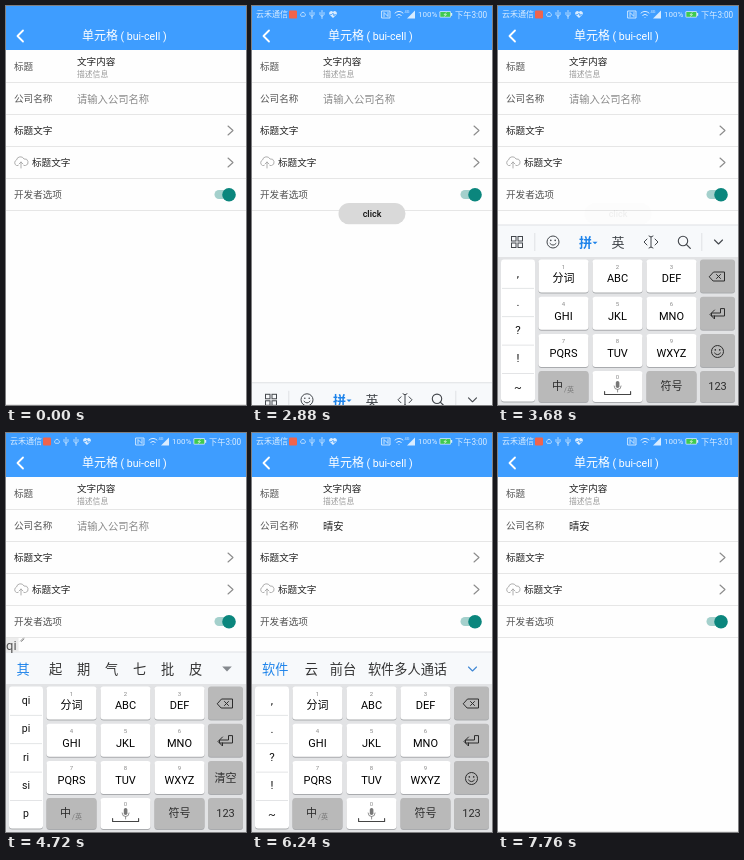
An HTML page with a canvas that plays this animation: 240x399 px, repeating every 8000 ms.

```html
<!DOCTYPE html>
<html lang="zh-CN">
<head>
<meta charset="utf-8">
<title>bui-cell</title>
<style>
html, body { margin: 0; width: 100%; height: 100%; overflow: hidden; background: #fff; }
canvas { display: block; width: 240px; height: 399px; }
</style>
</head>
<body>
<canvas id="stage"></canvas>
<script>
const W = 240, H = 399, LOOP = 8000, STEP = 80;
const FONT = 'Roboto, "Noto Sans CJK SC", "Noto Sans CJK", sans-serif';
const canvas = document.getElementById('stage');
const c = canvas.getContext('2d');
const dpr = window.devicePixelRatio || 1;
canvas.width = W * dpr;
canvas.height = H * dpr;

const clamp = v => Math.max(0, Math.min(1, v));
const ramp = (t, a, b) => clamp((t - a) / (b - a));
const smooth = p => p * p * (3 - 2 * p);

// y is the optical middle of the line
function text(s, x, y, size, color, weight = 400, align = 'left') {
  c.font = `${weight} ${size}px ${FONT}`;
  c.textAlign = align;
  c.fillStyle = color;
  c.fillText(s, x, y + size * 0.37);
}
const label = (s, x, y, size, color = '#111', weight) => text(s, x, y, size, color, weight, 'center');

function rect(x, y, w, h, color) {
  c.fillStyle = color;
  c.fillRect(x, y, w, h);
}
function round(x, y, w, h, r, color) {
  c.fillStyle = color;
  c.beginPath();
  c.roundRect(x, y, w, h, r);
  c.fill();
}
function disc(x, y, r, color) {
  c.fillStyle = color;
  c.beginPath();
  c.arc(x, y, r, 0, 7);
  c.fill();
}
function ring(x, y, r, color, width = 1) {
  c.strokeStyle = color;
  c.lineWidth = width;
  c.beginPath();
  c.arc(x, y, r, 0, 7);
  c.stroke();
}
function path(d, x, y, color, width = 1, fill = false) {
  c.save();
  c.translate(x, y);
  const p = new Path2D(d);
  if (fill) {
    c.fillStyle = color;
    c.fill(p);
  } else {
    c.strokeStyle = color;
    c.lineWidth = width;
    c.lineJoin = c.lineCap = 'round';
    c.stroke(p);
  }
  c.restore();
}
const triangle = (x, y, r, color) => path(`M${-r} ${-r / 2}H${r}L0 ${r / 2}Z`, x, y, color, 1, true);
function smiley(x, y, color) {
  ring(x, y, 6, color);
  disc(x - 2.2, y - 1.6, 0.8, color);
  disc(x + 2.2, y - 1.6, 0.8, color);
  path('M-3 1.5Q0 5 3 1.5', x, y, color);
}

function statusBar(t) {
  c.globalAlpha = ramp(t, 0, 400);
  const ink = '#d9ecff';
  text('云禾通信', 4, 8.5, 8, ink);
  round(37, 4.5, 8, 8, 1, '#f0644c');
  path('M-2 2A1.6 1.6 0 0 1 -1.6 -.6A1.7 1.7 0 0 1 1.6 -.6A1.6 1.6 0 0 1 2 2Z', 51, 8, ink, 0.8);
  for (const x of [60, 70]) path('M0 4V-4M-2 -2V0L0 2L2 0V-2', x, 8.5, ink, 0.8);
  path('M0 3.5L-3.5 0A2 2 0 0 1 0 -2.5A2 2 0 0 1 3.5 0Z', 81, 8.5, ink, 1, true);
  path('M-2.5 0H-1L0 -1.5L1 1.5L1.5 0H2.5', 81, 8.5, '#3b9cff', 0.7);
  path('M-4 -3.5H4V3.5H-4ZM-2 2V-2L2 2V-2', 134, 8.5, ink, 0.9);
  path('M-4 -1.5Q0 -5 4 -1.5M-2.3 0.8Q0 -1.4 2.3 0.8M0 3V3', 147, 8.5, ink, 1);
  text('4G', 152.5, 6, 4, ink);
  path('M-4 4L4 4L4 -4Z', 159, 8.5, ink, 1, true);
  text('100%', 166, 8.5, 8, ink);
  round(187.5, 5.2, 11.5, 6.4, 1, ink);
  rect(188.3, 6, 10, 4.8, '#3fca50');
  rect(199, 7, 1.2, 2.8, ink);
  path('M.8 -1.8L-1.2 .2H1.2L-.8 1.8', 193.3, 8.4, '#fff', 0.6);
  text(t < 6560 ? '下午3:00' : '下午3:01', 203, 8.5, 8.2, ink);
  c.globalAlpha = 1;
}

function page(t) {
  rect(0, 0, W, H, '#fefefe');
  rect(0, 0, W, 44, '#3e9dff');
  path('M3 -5.5L-2.5 0L3 5.5', 14, 30, '#fff', 1.8);
  text('单元格', 76, 30, 12, '#fff');
  text('( bui-cell )', 114.5, 30, 10.6, '#fff');
  statusBar(t);

  for (let y = 76; y <= 204; y += 32) rect(0, y, W, 1, '#e6e6e6');
  rect(0, 398, W, 1, '#e6e6e6');
  const gray = '#555', dark = '#222', size = 9.6;
  text('标题', 8, 60.5, size, gray);
  text('文字内容', 71, 55.5, size, dark, 500);
  text('描述信息', 71, 67.7, 7.8, '#999');
  text('公司名称', 8, 92.7, size, gray);
  if (t < 6240) text('请输入公司名称', 71, 93, 10.3, '#8a8a8a');
  else text('晴安', 71, 92.7, 10.3, dark);
  text('标题文字', 8, 124.6, size, dark, 500);
  text('标题文字', 26, 156.6, size, dark, 500);
  for (const y of [124.5, 156.5]) path('M-2.5 -4.5L2.5 0L-2.5 4.5', 224.5, y, '#8c8c8c', 1.1);
  path('M-3 3.5H-4.5A3 3 0 0 1 -4.5 -2A4 4 0 0 1 3 -3A3.3 3.3 0 0 1 4.5 3.5H3M0 6V0M-2 2L0 0L2 2', 15, 156, '#a6a6a6', 0.9);
  text('开发者选项', 8, 188.5, size, gray);
  round(208.5, 184, 19, 9, 4.5, '#a4d0cc');
  disc(223, 188.7, 6.8, '#0b867d');
}

function toast(t) {
  if (t < 1840 || t >= 4400) return;
  c.globalAlpha = t < 2400 ? ramp(t, 1760, 2080) : Math.max(0.05, 1 - ramp(t, 3040, 3680));
  round(86.5, 197, 67, 21.3, 10.6, '#d9d9d9');
  label('click', 120, 207.3, 9, '#111', 500);
  c.globalAlpha = 1;
}

// [from, to, key]
const presses = [
  [4160, 4400, 'PQRS'], [4560, 4720, 'GHI'], [4880, 5040, 'MNO'],
  [5120, 5280, 'GHI'], [5440, 5600, 'ABC'], [5840, 5920, 'MNO'],
];
// [from, typed letters, candidates, side column]
const typing = [
  [4400, 'p', '平 去 请 前 其 人 却', 'p q r s'],
  [4720, 'qi', '其 起 期 气 七 批 皮', 'qi pi ri si p'],
  [5040, 'qin', '品 亲 琴 拼 频 勤 秦', 'pin qin pi qi p'],
  [5280, 'qing', '请 平 轻 青 庆 清 晴', 'ping qing pin qin pi'],
  [5600, "qing'a", '情爱 请啊 平 轻 青', 'ping qing pin qin pi'],
  [5920, "qing'an", '晴安 请安 平安 轻', 'ping qing pin qin pi'],
];
const KEYS = ['分词', 'ABC', 'DEF', 'GHI', 'JKL', 'MNO', 'PQRS', 'TUV', 'WXYZ'];
const COLS = [40.5, 94.5, 148.5], ROWS = [253.5, 290.7, 327.9, 365];

function key(x, y, w, color) {
  const h = y === 365 ? 31 : 33;
  round(x, y + 1, w, h, 3, '#a9abae');
  round(x, y, w, h, 3, color);
}

function toolbar() {
  const ink = '#43474c', y = 236;
  for (const dx of [-5.5, 1]) for (const dy of [-5.5, 1]) {
    c.strokeStyle = ink;
    c.lineWidth = 1;
    c.strokeRect(19 + dx, y + dy, 4.5, 4.5);
  }
  rect(36.5, 227, 0.7, 18, '#d5d8dc');
  smiley(55, y, ink);
  text('拼', 81, y, 13, '#1d83ea', 700);
  triangle(97, y + 1, 2.5, '#1d83ea');
  label('英', 120, y, 13, ink);
  path('M-4 -3L-7 0L-4 3M4 -3L7 0L4 3M0 -5V5M-2 -6L0 -5L2 -6M-2 6L0 5L2 6', 153, y, ink);
  ring(185, y - 1, 4.7, ink, 1.1);
  path('M0 0L4 4', 188.3, y + 2.3, ink, 1.2);
  rect(203.5, 227, 0.7, 18, '#d5d8dc');
  path('M-4 -2L0 2L4 -2', 220.5, y, ink, 1.1);
}

function candidates(words, x, gap) {
  words.forEach((w, i) => {
    text(w, x, 236.2, 13.2, i ? '#333' : '#1d83ea');
    x += w.length * 13.2 + gap + (i ? 0 : 4.5);
  });
}

function keyboard(t) {
  const up = smooth(ramp(t, 2790, 3200)), down = smooth(ramp(t, 7255, 7655));
  const shown = up - down;
  if (shown <= 0) return;
  const entry = t < 6240 ? typing.filter(s => t >= s[0]).pop() : null;
  const press = presses.find(p => t >= p[0] && t < p[1]);

  c.save();
  c.translate(0, 180 * (1 - shown));
  rect(0, 219, W, 180, '#e2e3e5');
  rect(0, 219, W, 32, '#f7f9fb');
  rect(0, 218.5, W, 1, '#dfe2e5');

  if (entry) {
    c.font = `400 13px ${FONT}`;
    const w = c.measureText(entry[1]).width;
    rect(0, 205, w + 2, 14, '#ececec');
    text(entry[1], 0, 212.2, 13, '#555');
    path('M-1.5 1.5L1.5 -1.5M-.5 2L2 -.5', w + 5.5, 206.5, '#777', 0.8);
    if (t >= 6160) rect(2, 222, 40, 27, '#dcebfa');
    candidates(entry[2].split(' '), 10.5, 14.8);
    triangle(221, 236, 4.8, '#85898e');
  } else if (t >= 6240) {
    if (t >= 6880) round(204, 224, 34, 24, 1, '#dfe3ee');
    candidates(['软件', '云', '前台', '软件多人通话'], 10, 11.8);
    path('M-4 -2L0 2L4 -2', 220.5, 236, '#3f87d4', 1.1);
  } else toolbar();

  // side column
  round(3, 254.5, 34, 142, 3, '#a9abae');
  round(3, 253.5, 34, 142, 3, '#fff');
  for (let i = 1; i < 5; i++) rect(4, 253.5 + i * 28.4, 32, 0.8, '#dcdee0');
  const side = entry ? entry[3].split(' ') : [',', '.', '?', '!', '~'];
  side.forEach((s, i) => label(s, 20, 267 + i * 28.4, entry ? 10.5 : 11.5));

  // letter keys
  const gray = '#b9b9b9', ink = '#2c2c2c';
  KEYS.forEach((s, i) => {
    const x = COLS[i % 3], y = ROWS[Math.floor(i / 3)];
    key(x, y, 50, press && press[2] === s ? gray : '#fff');
    label(i + 1, x + 25, y + 7.2, 6, '#888');
    label(s, x + 25, y + 18.8, 11, '#000', i ? 400 : 500);
  });

  // bottom row
  key(COLS[0], 365, 50, gray);
  text('中', 54, 380.2, 11, ink);
  text('/英', 66, 383, 7, '#777');
  key(COLS[1], 365, 50, '#fff');
  label('0', 119.5, 370.5, 6, '#888');
  round(117.8, 375, 3.6, 7, 1.8, '#777');
  path('M-3.5 -2A3.5 3.5 0 0 0 3.5 -2M0 1.5V4', 119.6, 382, '#777', 0.8);
  path('M-13 0V3H13V0', 119.6, 385.5, '#444', 1.1);
  key(COLS[2], 365, 50, gray);
  label('符号', 173.5, 380.2, 11, ink);

  // right column
  ROWS.forEach(y => key(202, y, 35, gray));
  path('M-8 0L-4 -4.5H7V4.5H-4ZM-1 -2L3 2M3 -2L-1 2', 219.5, 270.5, ink);
  path('M7 -5V2H-6V-1H3V-5ZM-3 -4L-7.5 .5L-3 5V2', 219.5, 308, ink);
  if (entry) label('清空', 219.5, 345, 11, ink);
  else smiley(219.5, 345.5, ink);
  label('123', 219.5, 380.2, 11, ink);
  c.restore();
}

function draw(now) {
  const t = Math.floor((now % LOOP) / STEP) * STEP;
  c.setTransform(dpr, 0, 0, dpr, 0, 0);
  page(t);
  toast(t);
  keyboard(t);
}

let start;
function tick(now) {
  start ??= now;
  draw(now - start);
  requestAnimationFrame(tick);
}
draw(0);
requestAnimationFrame(tick);
</script>
</body>
</html>
```
